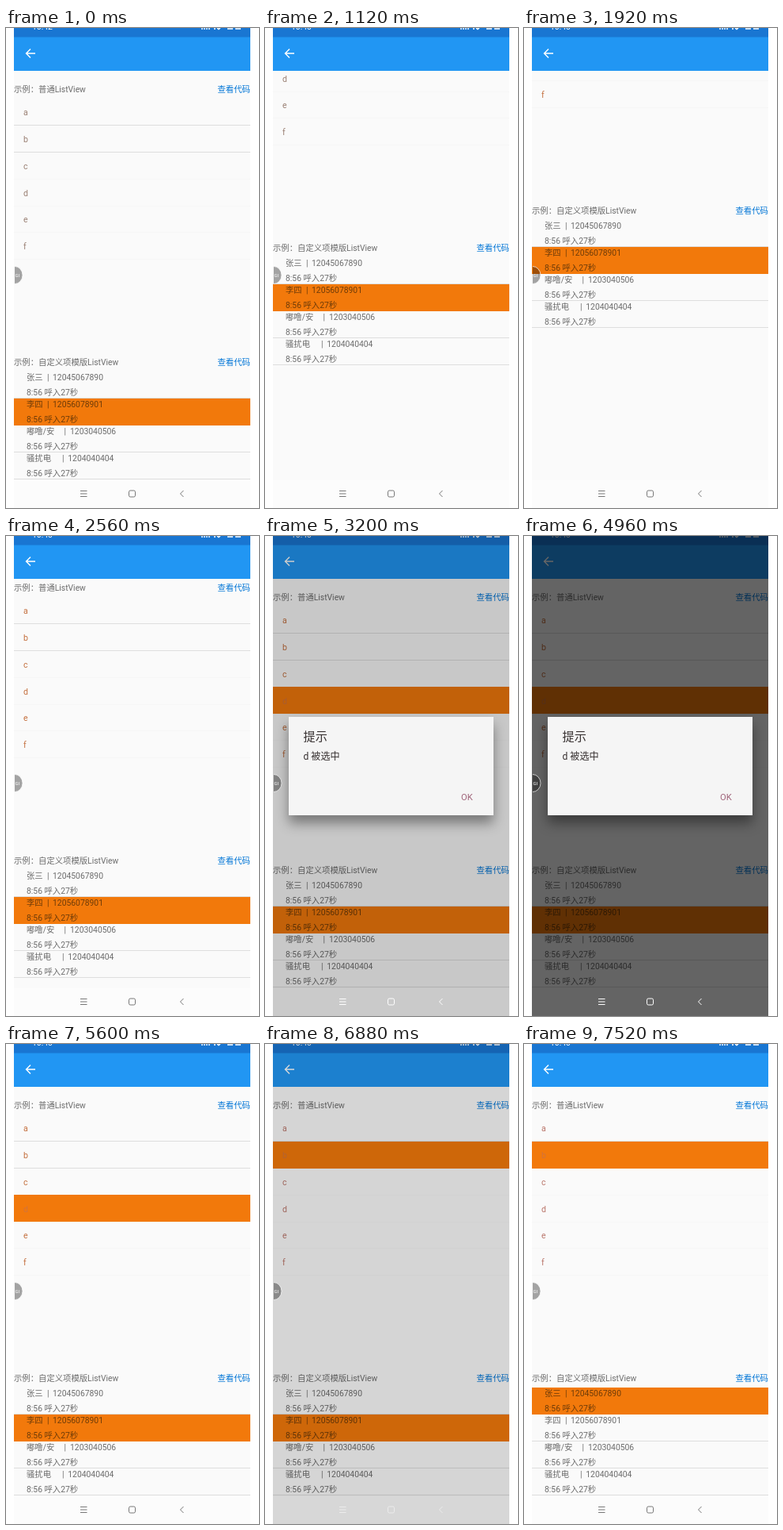
These frames come from a looping animation (320 by 605 pixels, 9760 ms). An HTML page:

```html
<!DOCTYPE html>
<html lang="zh-CN">
<head>
<meta charset="utf-8">
<style>
html, body { margin: 0; width: 100%; height: 100%; overflow: hidden; background: #fff; }
svg { display: block; }
text { font-family: Roboto, "Noto Sans CJK SC", "Noto Sans CJK", sans-serif; white-space: pre; }
.card { filter: drop-shadow(0 10px 8px rgba(0, 0, 0, .4)); }
</style>
</head>
<body>
<svg id="stage" width="320" height="605"></svg>
<script>
const LOOP = 9760, STEP = 160, MAX_SCROLL = 235.3;
const PITCH = 33.85, ORANGE = '#f2790b', GREY = '#6c6c6c';
const stage = document.getElementById('stage');

// start time, selected letter, dim, dialog opacity, dialog letter
const states = [
  [0, '', 0, 0, ''],
  [2880, 'd', 0, 0, ''],
  [3200, 'd', .2, 1, 'd'],
  [3360, 'd', .5, 1, 'd'],
  [3520, 'c', .58, 1, 'd'],
  [3680, 'c', .6, 1, 'd'],
  [4320, 'c', .55, .77, 'd'],
  [4480, 'c', .15, 0, ''],
  [4640, 'c', 0, 0, ''],
  [4800, 'd', .2, 1, 'd'],
  [4960, 'd', .6, 1, 'd'],
  [5440, 'd', .15, 0, ''],
  [5600, 'd', 0, 0, ''],
  [6080, 'b', .2, 1, 'b'],
  [6240, 'b', .6, 1, 'b'],
  [6880, 'b', .15, 0, ''],
  [7040, 'b', .04, 0, ''],
  [7200, 'b', 0, 0, '']
];

// name, bar x, number x, number
const calls = [
  ['张三', 52, 59, '12045067890'],
  ['李四', 52, 59, '12056078901'],
  ['嘟噜/安', 73.5, 81, '1203040506'],
  ['骚扰电', 71, 78.3, '1204040404']
];

const text = (x, y, s, fill = GREY, size = 10.35, extra = '') =>
  `<text x="${x}" y="${y}" fill="${fill}" font-size="${size}" ${extra}>${s}</text>`;
const rect = (x, y, w, h, fill, extra = '') =>
  `<rect x="${x}" y="${y}" width="${w}" height="${h}" fill="${fill}" ${extra}/>`;
const line = (d, color, width = 1) =>
  `<path d="${d}" fill="none" stroke="${color}" stroke-width="${width}"/>`;
const rule = (y, color) => rect(10, Math.round(y) - 1, 299, 1, color);

const ease = u => (1 - Math.cos(Math.PI * Math.min(1, Math.max(0, u)))) / 2;
const scrollAt = t =>
  Math.round(MAX_SCROLL * (ease((t - 480) / 1120) - ease((t - 1600) / 1120)));

function heading(y, title) {
  return text(10, y, '示例：' + title + 'ListView') +
    text(309, y, '查看代码', '#0075d6', 10.4, 'text-anchor="end"');
}

function letters(t, selected) {
  const ink = t < 1760 ? '#9a8074' : t < 6080 ? '#c4703f' : '#b9756a';
  return [...'abcdef'].map((c, i) => {
    const top = 89.2 + i * PITCH, on = c === selected;
    return rule(top + PITCH, i < 2 ? '#dedede' : '#f6f6f6') +
      (on ? rect(10, Math.floor(top), 299, 34, ORANGE) : '') +
      text(22, top + 20.8, c, on ? '#d2743c' : ink, 10.6);
  }).join('');
}

function callLog(selected) {
  return calls.map(([name, bar, x, number], i) => {
    const top = 433 + i * 34, on = i === selected, ink = on ? '#6f3c09' : GREY;
    return (on ? rect(10, top, 299, 34, ORANGE) : rule(top + 34, '#dedede')) +
      text(26, top + 11.2, name, ink) + text(bar, top + 11.2, '|', ink) +
      text(x, top + 11.2, number, ink) + text(26, top + 30, '8:56 呼入27秒', ink);
  }).join('');
}

function topBar(t) {
  return rect(10, 0, 299, 12, '#1976d2') + rect(10, 11.5, 299, 42.5, '#2196f3') +
    text(33, 2, t < 960 ? '10:42' : '10:43', '#fff', 10.4) +
    line('M248 0v2M251 0v2M254 0v2M257 0v2M263 1h2M267 0l2 1.5l2-1.5M280 1h7M290 1h7', '#fff', 1.4) +
    line('M37 32H26M31 26.5l-5.5 5.5L31 37.5', '#fff', 1.4);
}

function navIcons(color) {
  return line('M94 583.5h8.5M94 587h8.5M94 590.5h8.5M224.5 583l-4 4l4 4', color) +
    `<rect x="155.5" y="583" width="8" height="8" rx="1.8" fill="none" stroke="${color}"/>`;
}

function bubble() {
  return '<path d="M11 300.5A10 11 0 0 1 11 322.5" fill="#000" fill-opacity=".35" stroke="#fff" stroke-opacity=".7"/>' +
    text(11.5, 313.7, 'GI', '#fff', 6);
}

function dialog(opacity, letter) {
  return `<g opacity="${opacity}">` + rect(30, 228, 259, 124, '#f5f5f5', 'class="card"') +
    text(48.5, 257.8, '提示', '#383232', 15.2) +
    text(48.5, 281.8, letter + ' 被选中', '#383232', 12.1) +
    text(248, 333, 'OK', '#a0647a', 11.2) + '</g>';
}

function draw(t) {
  const [, selected, dim, shown, letter] = states.findLast(s => s[0] <= t);
  stage.innerHTML = '<svg x="10" width="299" height="605" viewBox="10 0 299 605">' +
    rect(10, 0, 299, 605, '#fafafa') +
    `<g transform="translate(0 ${-scrollAt(t)})">` +
    heading(81, '普通') + letters(t, selected) +
    heading(425, '自定义项模版') + callLog(t < 7520 ? 1 : 0) + '</g>' +
    topBar(t) + rect(10, 570, 299, 35, '#fcfcfc') +
    (dim ? '' : navIcons('#777')) +
    rect(10, 0, 299, 605, '#000', `opacity="${dim}"`) +
    (dim ? navIcons(dim < .16 ? '#ececec' : '#fff') : '') +
    bubble() + (shown ? dialog(shown, letter) : '') + '</svg>';
}

const start = performance.now();
let last = -1;
function tick() {
  const t = Math.floor((performance.now() - start) % LOOP / STEP) * STEP;
  if (t !== last) draw(last = t);
  requestAnimationFrame(tick);
}
tick();
</script>
</body>
</html>
```
